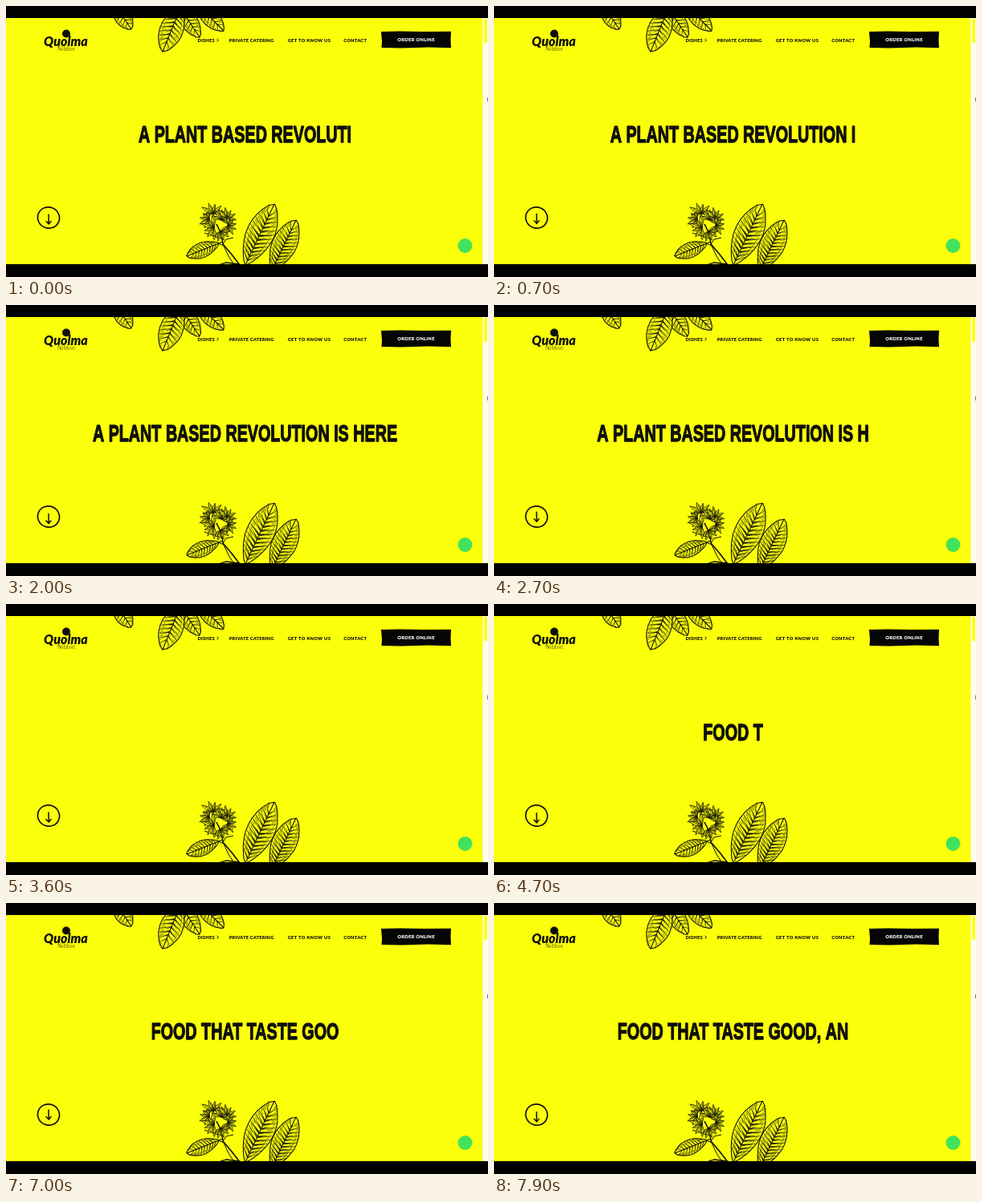
An HTML page with a canvas for the animation above (8 s loop, 600 by 338 pixels).

```html
<!DOCTYPE html>
<html lang="en">
<head>
<meta charset="utf-8">
<title>A plant based revolution</title>
<style>
  html, body { margin: 0; width: 100%; height: 100%; overflow: hidden; background: #000; }
  canvas { display: block; }
</style>
</head>
<body>
<canvas id="stage" width="600" height="338"></canvas>
<script>
const LOOP = 8000;
const INK = '#10100a';
const YELLOW = '#fcff0a';
const FIRST = 'A PLANT BASED REVOLUTION IS HERE';
const SECOND = 'FOOD THAT TASTE GOOD, AN';

const stage = document.getElementById('stage').getContext('2d');
const backdrop = document.createElement('canvas');
backdrop.width = 600;
backdrop.height = 338;
let ctx = backdrop.getContext('2d');

let seed = 7;
const random = () => (seed = seed * 16807 % 2147483647) / 2147483647;

function line(points, width = 1) {
  ctx.lineWidth = width;
  ctx.beginPath();
  points.forEach(([x, y]) => ctx.lineTo(x, y));
  ctx.stroke();
}

function shape(points, color) {
  ctx.fillStyle = color;
  ctx.beginPath();
  points.forEach(([x, y]) => ctx.lineTo(x, y));
  ctx.fill();
}

function disc(x, y, r, color) {
  ctx.fillStyle = color;
  ctx.beginPath();
  ctx.arc(x, y, r, 0, 7);
  ctx.fill();
}

function label(text, x, y, font, color = INK, spacing = 0) {
  ctx.font = font;
  ctx.letterSpacing = spacing + 'px';
  ctx.fillStyle = color;
  ctx.fillText(text, x, y);
}

// An engraved leaf from its stalk to its tip; half is half its width.
function leaf(x, y, tipX, tipY, half, veins) {
  const length = Math.hypot(tipX - x, tipY - y);
  const edge = u => half * Math.sin(Math.PI * u ** 1.1) ** 0.7;
  ctx.save();
  ctx.translate(x, y);
  ctx.rotate(Math.atan2(tipY - y, tipX - x));
  const outline = [];
  for (let i = 0; i <= 40; i++) {
    const u = i < 20 ? i / 20 : 2 - i / 20;
    outline.push([u * length, (i < 20 ? -1 : 1) * (edge(Math.min(u, 0.999)) + random() * 0.4)]);
  }
  shape(outline, YELLOW);
  line(outline, 1.1);
  line([[-4, 0], [length, 0]], 1.1);
  for (const side of [-1, 1]) {
    for (let i = 1; i < veins; i++) {
      const u = i / veins * 0.86;
      const v = u + 0.12;
      const end = [v * length, side * edge(v) * 0.95];
      line([[u * length, 0], end], 0.6);
      shape([[u * length, 0], [end[0] - 1, end[1] * (0.6 + random() * 0.3)],
        [(u + 0.035) * length, side]], INK);
      for (let k = 0; k < 2; k++) {
        const shift = (k + 1) / 3 / veins * length;
        const reach = 0.45 + random() * 0.35;
        line([[end[0] + shift, end[1] * 0.88],
          [(u + 0.12 * reach) * length + shift, end[1] * reach]], 0.4);
      }
    }
  }
  ctx.restore();
}

// A floret with pointed, lined petals.
function floret(x, y, size, angle) {
  for (let i = 0; i < 6; i++) {
    const a = angle + (i - 2.5) * 0.62;
    const r = size * (0.75 + random() * 0.35);
    const at = (d, turn) => [x + Math.cos(a + turn) * d * r, y + Math.sin(a + turn) * d * r];
    const petal = [[x, y], at(0.55, 0.27), at(1, 0), at(0.55, -0.27), [x, y]];
    shape(petal, YELLOW);
    line(petal, 0.8);
    line([[x, y], at(0.75, 0.05)], 0.8);
  }
}

function drawPlants() {
  ctx.strokeStyle = INK;
  ctx.lineJoin = 'round';
  leaf(134, -4, 156, 29, 10, 8);
  leaf(236, -4, 271, 31, 10, 9);
  leaf(214, -2, 241, 39, 10, 9);
  leaf(218, 0, 195, 57, 14, 10);

  line([[262, 272], [268, 284], [270, 297], [281, 310], [291, 323]], 1.6);
  line([[264, 296], [271, 299], [277, 312], [284, 323]], 1);
  line([[247, 283], [261, 288], [269, 290]], 1);
  line([[283, 289], [274, 291], [270, 297]], 1);
  line([[267, 322], [274, 320], [290, 322]], 1.3);
  leaf(265, 296, 225, 312, 9, 10);
  leaf(298, 323, 334, 247, 17, 13);
  leaf(331, 330, 361, 267, 15, 13);
  floret(258, 259, 15, -1.7);
  floret(253, 266, 13, 3);
  floret(259, 276, 16, 3.1);
  floret(268, 267, 13, -1.2);
  floret(275, 265, 15, -0.8);
  floret(276, 274, 13, 0.1);
  floret(267, 281, 12, 0.9);
}

function drawBackdrop() {
  ctx.fillStyle = YELLOW;
  ctx.fillRect(0, 0, 600, 338);
  drawPlants();

  disc(75, 34.5, 5, INK);
  label('Quolma', 47, 50, 'italic 900 16px Lato, sans-serif');
  label('Nibbie', 64, 56, '300 7.5px Lato, sans-serif', INK, 0.2);

  const nav = '900 5.7px Lato, sans-serif';
  label('DISHES', 238.5, 45, nav, INK, 0.2);
  line([[262.5, 41], [264.7, 42.6], [262.5, 44.2]], 0.9);
  label('PRIVATE CATERING', 277.7, 45, nav, INK, 0.2);
  label('GET TO KNOW US', 350.7, 45, nav, INK, 0.3);
  label('CONTACT', 420.2, 45, nav, INK, 0.3);

  ctx.lineWidth = 1.7;
  ctx.beginPath();
  ctx.ellipse(53, 264, 13.6, 13.1, 0.4, 0, 7);
  ctx.stroke();
  disc(571.5, 299, 9, '#43e25c');

  ctx.fillStyle = '#fffff0';
  ctx.fillRect(593.5, 15, 6.5, 307);
  ctx.fillStyle = YELLOW;
  ctx.fillRect(595.5, 16, 3.5, 30);
  ctx.fillStyle = '#777';
  ctx.fillRect(599, 114, 1, 5);
  ctx.fillStyle = '#000';
  ctx.fillRect(0, 0, 600, 15);
  ctx.fillRect(0, 322, 600, 16);
}

function headlineAt(t) {
  if (t < 2580) return FIRST.slice(0, 22 + Math.floor(t / 175));
  if (t < 3620) return FIRST.slice(0, Math.max(0, 32 - Math.floor((t - 2580) / 31)));
  return SECOND.slice(0, Math.floor((t - 3620) / 176));
}

function drawHeadline(text) {
  ctx.save();
  ctx.translate(297.5, 169.5);
  ctx.scale(0.68, 1);
  ctx.textAlign = 'center';
  ctx.lineWidth = 1.3;
  label(text, 0, 0, 'bold 29px "Liberation Sans", Arial, sans-serif');
  ctx.strokeText(text, 0, 0);
  ctx.restore();
}

function drawButton(t) {
  const wobble = Math.max(0, 1 - Math.abs(t - 1400) / 200);
  ctx.save();
  ctx.translate(510.5, 42);
  ctx.rotate(-0.025 * wobble);
  shape([[-43.5, -10], [-20, -10.5], [10, -10], [43.5, -10.3], [43, 0], [43.5, 10.2],
    [15, 9.6], [-18, 10.4], [-43, 10], [-42.5, 2]], '#050505');
  ctx.textAlign = 'center';
  label('ORDER ONLINE', 0, 2, '900 5.9px Lato, sans-serif', '#fff', 0.2);
  ctx.restore();
}

function drawArrow(t) {
  const y = 265.5 + 1.5 * Math.cos((t - 300) / 1500 * 2 * Math.PI);
  line([[53, y - 6], [53.2, y + 5.5]], 1.5);
  line([[50, y + 2.5], [53.2, y + 6], [56, y + 2.5]], 1.5);
}

function frame(now) {
  const t = now % LOOP;
  ctx.drawImage(backdrop, 0, 0);
  drawButton(t);
  drawArrow(t);
  drawHeadline(headlineAt(t).trim());
  requestAnimationFrame(frame);
}

drawBackdrop();
ctx = stage;
ctx.strokeStyle = INK;
ctx.lineJoin = ctx.lineCap = 'round';
requestAnimationFrame(frame);
</script>
</body>
</html>
```
